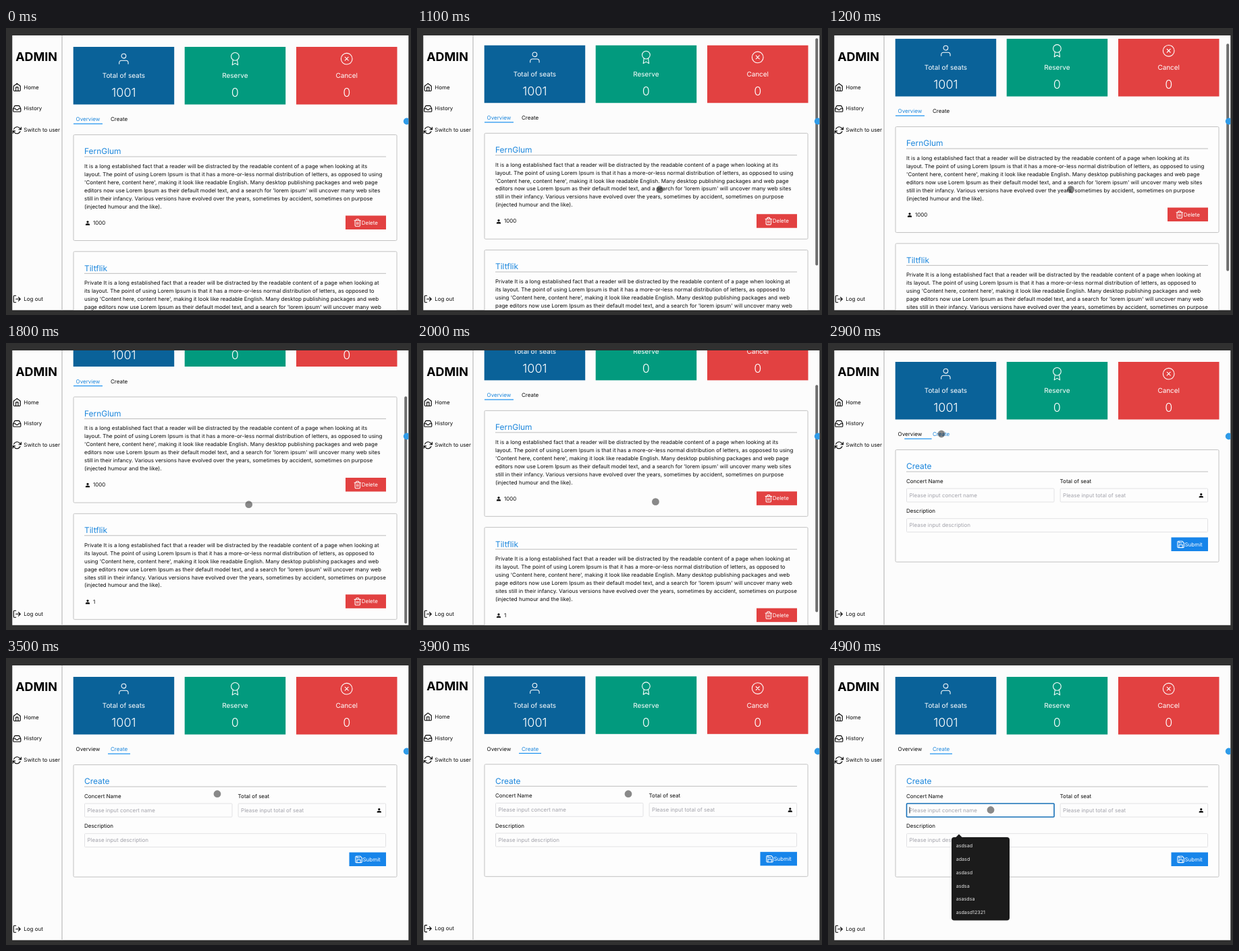
Animation of 600x426 px, one loop 5000 ms. Source, as an HTML page:

```html
<!DOCTYPE html>
<html lang="en">
<head>
<meta charset="utf-8">
<title>Admin dashboard</title>
<style>
  html, body { margin: 0; width: 100%; height: 100%; overflow: hidden; background: #303030; }
  svg { display: block; width: 600px; height: 426px; }
  text { font-family: Inter, "Noto Sans", sans-serif; text-rendering: geometricPrecision; white-space: pre; }
  .icon { fill: none; stroke-linecap: round; stroke-linejoin: round; }
</style>
</head>
<body>
<svg id="stage" viewBox="0 0 600 426"></svg>
<script>
const LOOP = 5000, STEP = 100, MAX_SCROLL = 78.5;
const TYPE_SCALE = 0.9965, LINE = 11.95;
const INK = '#0c0c0c', BLUE = '#1b86dc', RED = '#e24141';

const ICONS = {
  home: '<path d="M3 9l9-7 9 7v11a2 2 0 0 1-2 2H5a2 2 0 0 1-2-2z M9 22V12h6v10"/>',
  inbox: '<path d="M22 12h-6l-2 3h-4l-2-3H2 M5.45 5.11L2 12v6a2 2 0 0 0 2 2h16a2 2 0 0 0 2-2v-6l-3.45-6.89A2 2 0 0 0 16.76 4H7.24a2 2 0 0 0-1.79 1.11z"/>',
  refresh: '<path d="M23 4v6h-6 M1 20v-6h6 M3.51 9a9 9 0 0 1 14.85-3.36L23 10 M1 14l4.64 4.36A9 9 0 0 0 20.49 15"/>',
  logout: '<path d="M9 21H5a2 2 0 0 1-2-2V5a2 2 0 0 1 2-2h4 M16 17l5-5-5-5 M21 12H9"/>',
  user: '<path d="M20 21v-2a4 4 0 0 0-4-4H8a4 4 0 0 0-4 4v2"/><circle cx="12" cy="7" r="4"/>',
  award: '<circle cx="12" cy="8" r="7"/><path d="M8.21 13.89L7 23l5-3 5 3-1.21-9.12"/>',
  cancel: '<circle cx="12" cy="12" r="10"/><path d="M15 9l-6 6 M9 9l6 6"/>',
  trash: '<path d="M3 6h18 M19 6v14a2 2 0 0 1-2 2H7a2 2 0 0 1-2-2V6 M8 6V4a2 2 0 0 1 2-2h4a2 2 0 0 1 2 2v2 M10 11v6 M14 11v6"/>',
  save: '<path d="M19 21H5a2 2 0 0 1-2-2V5a2 2 0 0 1 2-2h11l5 5v11a2 2 0 0 1-2 2z M17 21v-8H7v8 M7 3v5h8"/>'
};

// Text is placed by the vertical middle of its line box.
const text = (str, x, mid, size = 8, fill = INK, extra = '') =>
  `<text x="${x}" y="${mid + size * 0.364}" font-size="${size * TYPE_SCALE}" fill="${fill}" ${extra}>${str}</text>`;
const centered = (str, x, mid, size, fill, extra = '') =>
  text(str, x, mid, size, fill, `text-anchor="middle" ${extra}`);
const rect = (x, y, w, h, fill, extra = '') =>
  `<rect x="${x}" y="${y}" width="${w}" height="${h}" fill="${fill}" ${extra}/>`;
const icon = (name, cx, cy, size, color, weight = 2) =>
  `<g class="icon" stroke="${color}" stroke-width="${weight}" transform="translate(${cx - size / 2} ${cy - size / 2}) scale(${size / 24})">${ICONS[name]}</g>`;
const person = (cx, cy) =>
  `<circle cx="${cx}" cy="${cy - 1.7}" r="1.6" fill="${INK}"/><path d="M${cx - 3.1} ${cy + 3.2}v-.9q0-1.8 3.1-1.8t3.1 1.8v.9z" fill="${INK}"/>`;

const panel = (y, h, title) =>
  rect(100, y, 479, h, '#fdfdfd', 'rx="1.5" stroke="#c2c2c2"') +
  text(title, 116, y + 24.5, 12, BLUE) +
  rect(116, y + 32, 447, 1, '#bdbdbd');

const button = (x, w, y, color, iconName, iconX, label, labelX) =>
  rect(x, y, w, 20.5, color) + icon(iconName, iconX, y + 10.4, 12.6, '#fff') +
  text(label, labelX, y + 10.2, 8, '#fff');

const concert = (y, title, lines, seats) =>
  panel(y, 157, title) +
  lines.map((line, i) => text(line, 116, y + 46.5 + i * LINE)).join('') +
  person(121, y + 131) + text(seats, 129, y + 130.3) +
  button(503, 60, y + 120, RED, 'trash', 520.8, 'Delete', 526.8);

const stat = (x, color, iconName, label, value) =>
  rect(x, 28, 149.5, 85.5, color) + icon(iconName, x + 74.7, 45.7, 20, '#fff', 1.3) +
  centered(label, x + 74.7, 70.7, 10, '#fff') +
  centered(value, x + 74.7, 95.7, 18, '#fff', 'font-weight="300"');

const field = (id, label, hint, x, y, w) =>
  text(label, x, y - 10.7) +
  rect(x + .5, y + .5, w - 1, 20, '#fdfdfd', `id="${id}" rx="1" stroke="#e2e2e4"`) +
  text(hint, x + 4.5, y + 10.3, 8, '#a3a3ab');

const menuItem = (iconName, label, y) => icon(iconName, 16.3, y + .3, 13.3, '#000') + text(label, 26.3, y);

const FIRST = [
  'It is a long established fact that a reader will be distracted by the readable content of a page when looking at its',
  'layout. The point of using Lorem Ipsum is that it has a more-or-less normal distribution of letters, as opposed to using',
  "'Content here, content here', making it look like readable English. Many desktop publishing packages and web page",
  "editors now use Lorem Ipsum as their default model text, and a search for 'lorem ipsum' will uncover many web sites",
  'still in their infancy. Various versions have evolved over the years, sometimes by accident, sometimes on purpose',
  '(injected humour and the like).'
];
const SECOND = [
  'Private It is a long established fact that a reader will be distracted by the readable content of a page when looking at',
  'its layout. The point of using Lorem Ipsum is that it has a more-or-less normal distribution of letters, as opposed to',
  "using 'Content here, content here', making it look like readable English. Many desktop publishing packages and web",
  "page editors now use Lorem Ipsum as their default model text, and a search for 'lorem ipsum' will uncover many web",
  'sites still in their infancy. Various versions have evolved over the years, sometimes by accident, sometimes on purpose',
  '(injected humour and the like).'
];
const SUGGESTIONS = ['asdsad', 'adasd', 'asdasd', 'asdsa', 'asasdsa', 'asdasd12321'];

document.getElementById('stage').innerHTML = `
  <clipPath id="view"><rect x="9.3" y="11" width="587" height="407.8"/></clipPath>
  ${rect(0, 0, 600, 426, '#303030')}
  ${rect(9.3, 11, 587, 407.8, '#fcfcfc')}
  <g clip-path="url(#view)">
    <g id="page">
      <g id="content">
        ${stat(99.7, '#0a6299', 'user', 'Total of seats', '1001')}
        ${stat(264.7, '#029a7e', 'award', 'Reserve', '0')}
        ${stat(430, RED, 'cancel', 'Cancel', '0')}
        ${text('Overview', 103.6, 135.3, 8, INK, 'id="tabOverview"')}
        ${text('Create', 155, 135.3, 8, INK, 'id="tabCreate"')}
        ${rect(100, 141.6, 43, 1.2, '#1890f0', 'id="underline"')}
        <g id="overview">
          ${concert(158.5, 'FernGlum', FIRST, '1000')}
          ${concert(331.8, 'Tiltflik', SECOND, '1')}
        </g>
        <g id="create">
          ${panel(158.5, 166.5, 'Create')}
          ${field('name', 'Concert Name', 'Please input concert name', 116, 215.5, 219.5)}
          ${field('seats', 'Total of seat', 'Please input total of seat', 343.6, 215.5, 219.5)}
          ${field('description', 'Description', 'Please input description', 116, 260.2, 447)}
          ${person(552.8, 226.3)}
          ${button(508.5, 54.5, 288.5, '#1785ea', 'save', 522.6, 'Submit', 528.5)}
          ${rect(120.6, 221, .8, 9.5, INK, 'id="caret"')}
        </g>
      </g>
      ${rect(82, 0, 2, 426, '#d5d5d5')}
      ${centered('ADMIN', 45, 42.2, 18, '#000', 'font-weight="700"')}
      ${menuItem('home', 'Home', 87.6)}
      ${menuItem('inbox', 'History', 119.5)}
      ${menuItem('refresh', 'Switch to user', 151.5)}
      ${menuItem('logout', 'Log out', 402)}
    </g>
    ${rect(590.2, 13.3, 4, 337.3, '#6e6e6e', 'id="thumb" rx="2"')}
    <circle cx="593.8" cy="138.5" r="5" fill="#2f9be8"/>
    <g id="suggestions">
      <path d="M189 266.5L194 261.5L199 266.5z" fill="#1b1b1b"/>
      ${rect(183, 266, 86, 123.5, '#1b1b1b', 'rx="4"')}
      ${SUGGESTIONS.map((s, i) => text(s, 189.7, 278.4 + i * 19.85, 7.2, '#e4e4e4')).join('')}
    </g>
    <circle id="cursor" r="5.4" fill="#000" fill-opacity=".46"/>
  </g>`;

const el = Object.fromEntries([...document.querySelectorAll('[id]')].map(node => [node.id, node]));
const set = (node, attrs) => { for (const key in attrs) node.setAttribute(key, attrs[key]); };
const show = (node, visible) => set(node, { visibility: visible ? 'visible' : 'hidden' });
const clamp = v => Math.min(1, Math.max(0, v));
const ease = v => { v = clamp(v); return v * v * (3 - 2 * v); };
const ramp = (t, from, to) => ease((t - from) / (to - from));

const POINTER = [[500, 586, 196], [1000, 359.7, 239.7], [1950, 359.7, 239.7], [2400, 176, 121.5],
  [2700, 168, 135], [3000, 168, 135], [3400, 313, 201.7], [4050, 313, 201.7], [4350, 241, 225.5]];

function pointerAt(t) {
  let [, x, y] = POINTER[0];
  for (let i = 1; i < POINTER.length; i++) {
    const [t0, x0, y0] = POINTER[i - 1], [t1, x1, y1] = POINTER[i];
    if (t < t0) break;
    const k = ramp(t, t0, t1);
    x = x0 + (x1 - x0) * k;
    y = y0 + (y1 - y0) * k;
  }
  return [x, y];
}

function draw(t) {
  const creating = t >= 2900, focused = t >= 4400;
  const scroll = MAX_SCROLL * (ramp(t, 1030, 1720) - ramp(t, 1850, 2300));
  const bounce = .7 * (ramp(t, 3500, 3700) - ramp(t, 3900, 4100));
  const slide = ramp(t, 2800, 3100);
  const [x, y] = pointerAt(t);

  set(el.content, { transform: `translate(0 ${-scroll})` });
  set(el.page, { transform: `translate(0 ${-bounce})` });
  show(el.overview, !creating);
  show(el.create, creating);
  set(el.tabOverview, { fill: creating ? INK : BLUE });
  set(el.tabCreate, { fill: creating ? BLUE : INK });
  set(el.underline, { x: 100 + 51 * slide, width: 43 - 10 * slide });
  set(el.thumb, { y: 13.3 + 66 * scroll / MAX_SCROLL, opacity: t < 1100 ? 0 : 1 - ramp(t, 2600, 2800) });
  set(el.name, focused ? { stroke: '#1670b8', 'stroke-width': 1.6 } : { stroke: '#e2e2e4', 'stroke-width': 1 });
  // The caret is a child of the form and must not outlive it.
  show(el.caret, creating && focused);
  show(el.suggestions, t >= 4500);
  show(el.cursor, t >= 500);
  set(el.cursor, { cx: x, cy: y });
}

function tick() {
  draw(Math.floor(performance.now() % LOOP / STEP) * STEP);
  requestAnimationFrame(tick);
}
tick();
</script>
</body>
</html>
```
